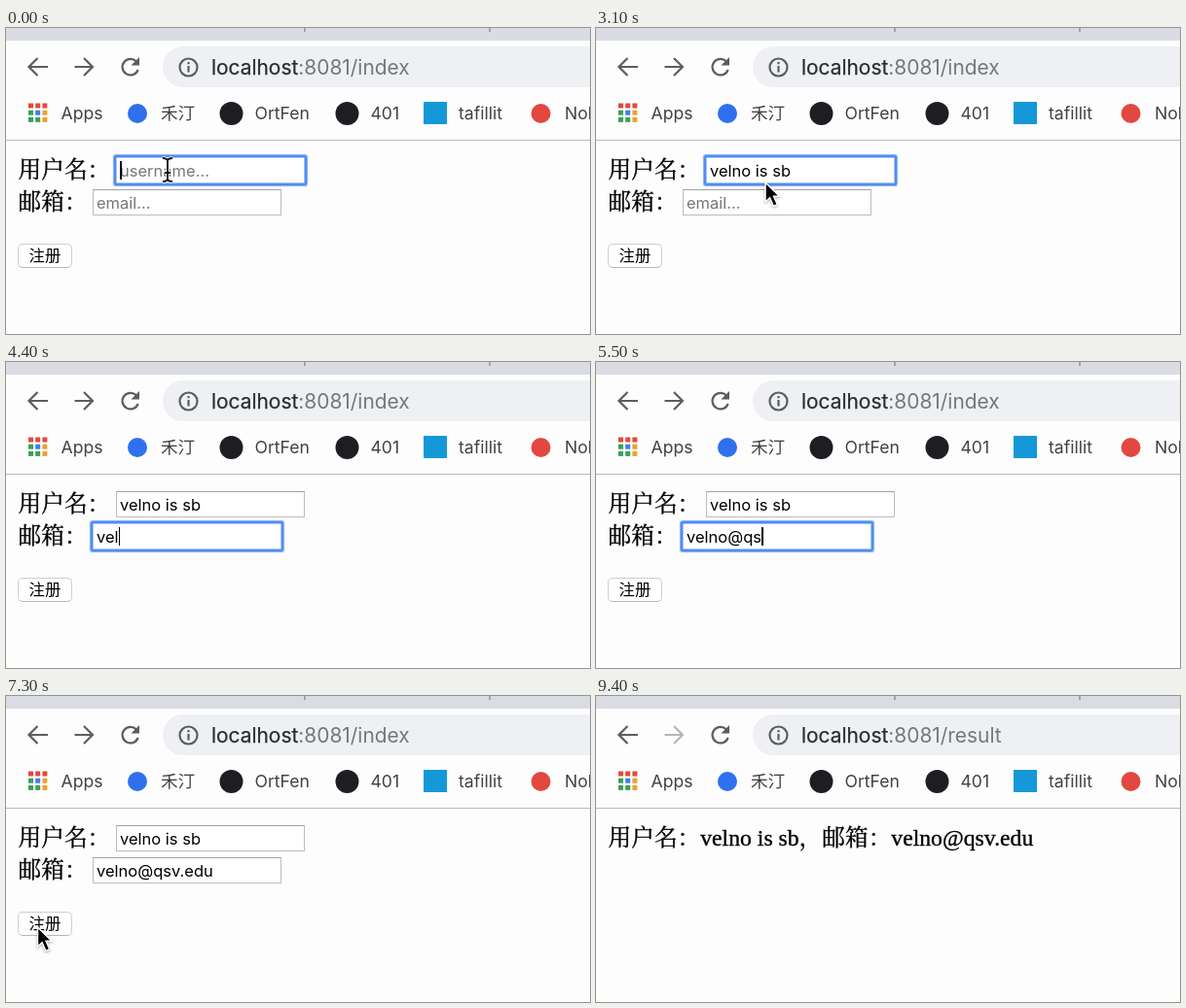
An HTML page that plays this animation: 600 by 315 pixels, repeating every 9500 ms.

```html
<!DOCTYPE html>
<html lang="zh-CN">
<head>
<meta charset="utf-8">
<title>Form demo</title>
<style>
html, body { margin: 0; width: 100%; height: 100%; overflow: hidden; background: #fefdfe; }
#stage { position: relative; width: 600px; height: 315px; overflow: hidden; }
svg { position: absolute; left: 0; top: 0; }
.ui { font-family: Inter, Roboto, "Noto Sans CJK SC", sans-serif; }
.url { font-size: 20.9px; fill: #74777c; }
.url .host { fill: #2b2c30; stroke: #2b2c30; stroke-width: .25px; }
.mark { font-size: 17.6px; fill: #3f4246; }
.page { font: 23.7px "Liberation Serif", "Noto Serif CJK SC", "Noto Sans CJK SC", serif; fill: #000; stroke: #000; stroke-width: .35px; }
.icon { fill: none; stroke: #5a5d62; stroke-width: 2.2; }
.field {
  position: absolute; box-sizing: border-box; width: 194px; height: 27px; padding-left: 3px;
  border: 1px solid #bcbcc0; border-top-color: #a2a2a6; background: #fff;
  font-size: 16.5px; line-height: 27px; white-space: pre; color: #000;
}
.field.focus {
  border-color: #a9c5f5; border-radius: 1px;
  box-shadow: 0 0 0 2px #4f8df2, 0 0 1px 3px #7fabf5;
}
.field.empty .value { color: #77777a; }
.field u { text-decoration: none; }
.field.focus u { text-decoration: underline dotted #e0453c 2.8px; text-underline-offset: 1px; text-decoration-skip-ink: none; }
.caret { position: absolute; top: 3px; width: 1.6px; height: 19px; background: #000; }
#user { left: 113px; top: 133px; }
#mail { left: 89px; top: 166px; }
#send {
  position: absolute; box-sizing: border-box; left: 12px; top: 221.5px; width: 56px; height: 25px;
  border: 1px solid #cdcdd1; border-bottom-color: #b6b6ba; border-radius: 5px; background: #fff;
  font-size: 16.4px; line-height: 23px; text-align: center; color: #000;
}
#arrow { filter: drop-shadow(0 1px 1px #0005); }
</style>
</head>
<body>
<div id="stage">
  <svg width="600" height="315">
    <rect width="600" height="13" fill="#d9dce2"/>
    <path d="M307 0V4M497 0V4" stroke="#8f9298" stroke-width="1.5"/>
    <rect x="161" y="19" width="480" height="42" rx="21" fill="#eff0f3"/>
    <path class="icon" d="M43 40H24M32.500 31L23.500 40L32.500 49"/>
    <path class="icon" id="forward" d="M70.500 40H89M80 31L89 40L80 49"/>
    <g id="reload">
      <path class="icon" d="M134 34.500A8.300 8.300 0 1 0 135.700 43"/>
      <path d="M137 30V38.500H128.500Z" fill="#5a5d62"/>
    </g>
    <path class="icon" id="stop" d="M120.500 32.500L135.500 47.500M135.500 32.500L120.500 47.500"/>
    <circle class="icon" cx="187.500" cy="40.500" r="9"/>
    <path class="icon" d="M187.500 39V45.500M187.500 35V37.300"/>
    <text class="ui url" x="211" y="48"><tspan class="host">localhost</tspan>:8081/<tspan id="route">index</tspan></text>

    <g id="apps"></g>
    <circle cx="135" cy="88" r="10" fill="#2f70ee"/>
    <circle cx="231.500" cy="88" r="12" fill="#1c1e22"/>
    <circle cx="350.500" cy="88" r="12" fill="#1c1e22"/>
    <rect x="429" y="76" width="24" height="23" fill="#1598d8"/>
    <circle cx="549.500" cy="88" r="10" fill="#e2483f"/>
    <g class="ui mark">
      <text x="56.500" y="94">Apps</text>
      <text x="159" y="94">禾汀</text>
      <text x="255.500" y="94">OrtFen</text>
      <text x="374.500" y="94">401</text>
      <text x="465" y="94">tafillit</text>
      <text x="574" y="94">Nob</text>
    </g>
    <path d="M0 115.500H600" stroke="#b9babd"/>

    <g class="page" id="labels">
      <text x="12.500" y="154">用户名：</text>
      <text x="12.500" y="187">邮箱：</text>
    </g>
    <text class="page" id="result" x="12.500" y="154"></text>
  </svg>
  <div id="form" class="ui">
    <div class="field" id="user"><span class="value"></span><span class="caret"></span></div>
    <div class="field" id="mail"><span class="value"></span><span class="caret"></span></div>
    <div id="send">注册</div>
  </div>
  <svg width="600" height="315">
    <path id="arrow" d="M0 0V20L4.600 15.800L8.400 24.500L12.300 22.800L8.600 14.300H14.500Z" fill="#000" stroke="#fff" stroke-width="1.500"/>
    <g id="beam" fill="none">
      <path d="M-5 -12Q0 -12 0 -9Q0 -12 5 -12M0 -9V9M-5 12Q0 12 0 9Q0 12 5 12M-3 3H3" stroke="#fff" stroke-width="3.500"/>
      <path d="M-5 -12Q0 -12 0 -9Q0 -12 5 -12M0 -9V9M-5 12Q0 12 0 9Q0 12 5 12M-3 3H3" stroke="#111" stroke-width="1.800"/>
    </g>
  </svg>
</div>
<script>
const LOOP = 9500, STEP = 100;
const $ = id => document.getElementById(id);
const show = (el, on) => { el.style.display = on ? '' : 'none'; };

const user = { el: $('user'), text: 'velno is sb', hint: 'username...', from: 0, to: 3500,
  keys: [600, 800, 1000, 1200, 1400, 1600, 2000, 2100, 2300, 2400, 2600] };
const mail = { el: $('mail'), text: 'velno@qsv.edu', hint: 'email...', from: 3500, to: 7200,
  keys: [3900, 4200, 4400, 4500, 4600, 5100, 5300, 5500, 5700, 5900, 6100, 6200, 6400] };

// Pointer runs: shape, then time, x, y stops; hidden after the last stop's time
const runs = [
  ['beam', [0, 166, 146], [600, 166, 146]],
  ['beam', [2800, 166, 146], [3000, 172, 154]],
  ['arrow', [3000, 173, 155], [3100, 174, 159], [3300, 173, 168]],
  ['beam', [3300, 171, 180], [3500, 168, 188], [3900, 168, 188]],
  ['arrow', [6600, 117.5, 218], [7100, 36, 237], [7300, 32.5, 238], [7400, 6, 272], [7500, 0, 280]]
];

const colors = ['#e2493d', '#e2493d', '#e2493d', '#3b9f57', '#3d7fea', '#eda02f', '#3b9f57', '#3b9f57', '#eda02f'];
$('apps').innerHTML = colors.map((c, i) =>
  `<rect x="${23 + i % 3 * 7.2}" y="${77.5 + Math.floor(i / 3) * 7.2}" width="5" height="5" fill="${c}"/>`).join('');
$('result').textContent = `用户名：${user.text}，邮箱：${mail.text}`;

function drawField(f, t) {
  const n = f.keys.filter(k => k <= t).length;
  const focus = t >= f.from && t < f.to;
  const value = f.el.querySelector('.value'), caret = f.el.querySelector('.caret');
  // The spell checker marks the part before the dot
  value.innerHTML = n ? f.text.slice(0, n).replace(/^\w+@\w+(?=\.)/, '<u>$&</u>') : f.hint;
  f.el.classList.toggle('empty', !n);
  f.el.classList.toggle('focus', focus);
  const last = n ? f.keys[n - 1] : f.from;
  show(caret, focus && (t - last) % 1000 < 500);
  caret.style.left = (n ? value.offsetLeft + value.getBoundingClientRect().width : 3) + 'px';
}

function drawPointer(t) {
  show($('arrow'), false);
  show($('beam'), false);
  for (const [shape, ...stops] of runs) {
    const i = stops.findIndex((s, k) => k + 1 < stops.length && t >= s[0] && t < stops[k + 1][0]);
    if (i < 0) continue;
    const [a, b] = [stops[i], stops[i + 1]];
    const p = (t - a[0]) / (b[0] - a[0]);
    const at = k => a[k] + (b[k] - a[k]) * p;
    show($(shape), true);
    $(shape).setAttribute('transform', `translate(${at(1)} ${at(2)})`);
  }
}

function draw(t) {
  const done = t >= 7700, loading = t >= 7400 && !done;
  show($('form'), !done);
  show($('labels'), !done);
  show($('result'), done);
  show($('stop'), loading);
  show($('reload'), !loading);
  $('route').textContent = done ? 'result' : 'index';
  $('forward').style.stroke = done ? '#b4b6ba' : '';
  drawField(user, t);
  drawField(mail, t);
  drawPointer(t);
}

const start = performance.now();
let shown = -1;
function tick() {
  const t = Math.floor((performance.now() - start) % LOOP / STEP) * STEP;
  if (t !== shown) draw(shown = t);
  requestAnimationFrame(tick);
}
tick();
</script>
</body>
</html>
```
